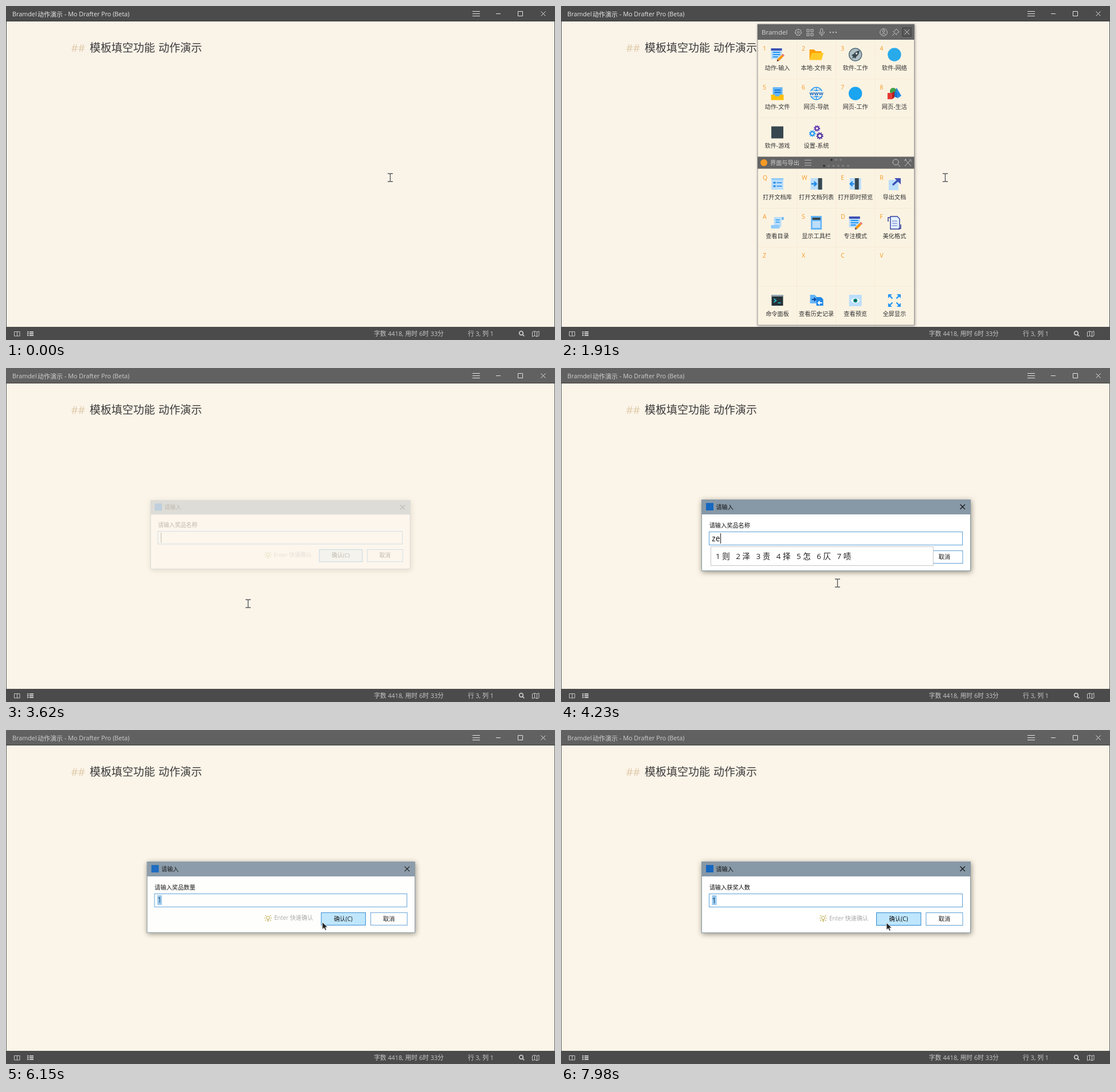
An HTML page that plays this animation: 958x584 px, repeating every 8 s.

```html
<!DOCTYPE html>
<html lang="zh">
<head>
<meta charset="utf-8">
<title>Template fill demo</title>
<style>
  html, body { margin: 0; width: 100%; height: 100%; overflow: hidden; background: #faf3e8; }
  svg { display: block; width: 100vw; height: 100vh; }
  text { font-family: "Open Sans", "Noto Sans CJK SC", "Noto Sans CJK", sans-serif; white-space: pre; }
  #popup { filter: drop-shadow(1px 1px 2px rgba(0, 0, 0, .35)); }
  #dialog { filter: drop-shadow(1px 2px 5px rgba(70, 75, 55, .6)); }
</style>
</head>
<body>
<svg id="stage" viewBox="0 0 958 584"></svg>
<script>
const $ = id => document.getElementById(id);

// Drawing helpers; text is placed by its vertical centre.
const R = (x, y, w, h, fill, more = '') => `<rect x="${x}" y="${y}" width="${w}" height="${h}" fill="${fill}" ${more}/>`;
const C = (x, y, r, fill, more = '') => `<circle cx="${x}" cy="${y}" r="${r}" fill="${fill}" ${more}/>`;
const P = (d, fill, more = '') => `<path d="${d}" fill="${fill}" ${more}/>`;
const L = (d, color, w = 1) => P(d, 'none', `stroke="${color}" stroke-width="${w}"`);
const T = (x, y, s, size, fill, more = '') =>
  `<text x="${x}" y="${y + size * .37}" font-size="${size}" fill="${fill}" ${more}>${s}</text>`;
const at = (x, y, s) => `<g transform="translate(${x} ${y})">${s}</g>`;
const mid = 'text-anchor="middle"';
const ring = (x, y, r, color, w = 1, more = '') => C(x, y, r, 'none', `stroke="${color}" stroke-width="${w}" ${more}`);
const gear = (x, y, r, color, w = 2) =>
  ring(x, y, r, color, w) + ring(x, y, r + w * .8, color, w, `stroke-dasharray="${r * .5}"`);
const lens = (x, y, r, color, w) => ring(x, y, r, color, w) + L(`M${x + r * .7},${y + r * .7}l${r * .9},${r * .9}`, color, w);

// Icons, centred on 0,0 and about 24 px wide.
const pale = '#bbdefb', blue = '#2196f3', navy = '#3f51b5', slate = '#37474f';
const pad = R(-11, -11, 19, 19, pale) + R(-11, -11, 19, 4, navy) +
  L('M-8,-4H5M-8,0H5M-8,4H1', blue, 2) + L('M1.5,9.5L9,2', '#ff9800', 4.2) +
  L('M9,2l2,-2', '#e57373', 4.2) + P('M-1,12L0,8L3,11Z', '#5d4037');
const pane = side => R(-10, -10, 20, 20, pale) + R(side > 0 ? 3 : -1, -10, 7, 20, slate) +
  L(side > 0 ? 'M-9,0H0M-4,-4L0,0L-4,4' : 'M-9,0H-2M-5,-4L-9,0L-5,4', '#1e88e5', 2.4);
const doc = (x, y, color) => P(`M${x},${y}h8l4,4v11h-12z`, color);

const topIcons = [
  pad,
  P('M-12,-9H-4L-1,-6H9V9H-12Z', '#ffa000') + P('M-8,-3H12.5L9,9.5H-12Z', '#ffca28'),
  C(0, 0, 11, '#b0bec5', 'stroke="#546e7a" stroke-width="1.5"') +
    P('M7,-7Q0,-6 -3,-1L-7,1L-4,3L-6,7L-2,5L0,7L2,3Q7,0 7,-7Z', slate) + C(2, -2, 1.7, '#eceff1'),
  C(0, 0, 11.7, '#29aaeb'),
  R(-8, -11, 17, 16, '#64b5f6') + L('M-5,-6H6M-5,-2H6', '#1976d2', 2) + P('M-11,2H-5L-3,5H3L5,2H11V11.5H-11Z', '#ffc107'),
  ring(0, 0, 10.7, blue, 1.5) + ring(0, 0, 5, blue, 1.2) + L('M0,-11V11M-9,-6H9M-9,6H9', blue, 1.2) +
    R(-12, -4, 24, 8, '#faf3e4') + T(0, -.8, 'www', 9.5, '#1565c0', mid + ' font-weight="700"'),
  C(0, 0, 11.7, '#1ba4f0'),
  C(-2, -4, 6, '#43a047') + P('M4,-10L-2,5L6,8Z', '#1976d2') + P('M4,-10L12,4L6,8Z', '#1e88e5') +
    R(-12, -1, 8, 11, '#e53935') + P('M-4,-1L0,-4V7L-4,10Z', '#b71c1c'),
  R(-10.5, -10.5, 21, 21, slate),
  gear(1, -7, 3, '#5e35b1') + gear(-7, 2, 3.2, blue) + gear(6, 6, 3.6, '#4527a0')
];
const lowIcons = [
  R(-10.5, -10, 21, 20, pale) + R(-10.5, -10, 21, 3, '#90caf9') + L('M-7,-2H-3M-7,4H-3', '#1e88e5', 3) + L('M-1,-2H8M-1,4H8', '#1e88e5', 1.6),
  pane(1),
  pane(-1),
  R(-10, -7, 17, 18, pale) + L('M-3,2L7,-7', navy, 3.4) + P('M0,-10H11V1Z', navy),
  P('M-6,-10H11V-5H7V7H-6Z', pale) + P('M-11,4H4V10H-11Z', '#90caf9') + R(8, -10, 3, 5, '#64b5f6') + L('M-3,-5H4M-3,-1H4', blue, 1.3),
  R(-9.5, -12, 19, 24, '#64b5f6') + R(-7, -9, 14, 4, slate) + R(-7, -3, 14, 12, pale),
  pad,
  P('M-7,-11H5L9,-7V11H-7Z', '#e3f2fd', 'stroke="#303f9f" stroke-width="1.4"') +
    L('M-4,-3H5M-4,1H5M-4,5H5', '#5c6bc0', 1.2) + L('M-11,-2V-9H-7M11,3V10H7', '#303f9f', 1.5),
  , , , ,
  R(-10, -10, 20, 19, '#263238') + R(-10, -10, 20, 3, '#90a4ae') + L('M-6,-3L-2,0L-6,3M1,4H6', '#26c6da', 1.6),
  doc(-11, -10, '#64b5f6') + doc(0, -6, '#1e88e5') + L('M-8,-2H-1M-4,-5L-1,-2L-4,1', '#0d47a1', 1.8) + L('M10,4H3M6,1L3,4L6,7', '#fff', 1.8),
  R(-11, -10, 22, 20, pale) + P('M-8,0Q0,-9 8,0Q0,9 -8,0Z', '#fff') + C(0, 0, 3.6, '#009688') + C(0, 0, 1.6, '#263238'),
  [0, 90, 180, 270].map(a => `<g transform="rotate(${a})">${P('M11,-11V-4L4,-11Z', blue) + L('M3.5,-3.5L8,-8', blue, 2.4)}</g>`).join('')
];

function grid(top, rows, keys, labels, icons) {
  let s = '';
  for (let i = 1; i < 4; i++) s += R(343 + i * 68.1, top, 1, rows * 68, '#f5ead4');
  for (let i = 1; i < rows; i++) s += R(344, top + i * 68, 272, 1, '#f5ead4');
  for (let i = 0; i < rows * 4; i++) {
    const x = 377.5 + i % 4 * 68.1, y = top + (i >> 2) * 68;
    s += T(x - 25.5, y + 15, keys[i] || '', 10.5, '#f59a23');
    if (labels[i]) s += at(x, y + 26, icons[i]) + T(x, y + 49.5, labels[i], 10.2, '#333', mid);
  }
  return s;
}

const lightGray = '#c4c4c4';
const popup = R(343, 32, 273.5, 526, '#fbf3e2', 'stroke="#999"') + R(343, 32, 273.5, 27, '#646464') +
  T(350, 45.5, 'Bramdel', 11.5, '#d6d6d6') + gear(414, 46, 5, lightGray, .9) + ring(414, 46, 1.8, lightGray, .9) +
  [[429, 41], [436, 41], [429, 48], [436, 48]].map(([x, y]) => R(x, y, 4, 4, 'none', `stroke="${lightGray}"`)).join('') +
  R(452.8, 39.5, 4, 8, 'none', `rx="2" stroke="${lightGray}"`) + L('M450.5,45Q451,50 455,50Q459,50 459.5,45M455,50V53', lightGray) +
  [470, 475, 480].map(x => C(x, 46, 1.2, lightGray)).join('') +
  ring(563, 46, 6.3, lightGray) + ring(563, 44, 2.1, lightGray) + L('M559,50.5Q563,45.5 567,50.5', lightGray) +
  L('M578,52L582,48M579,44L586,51M581,45L585,40L590,45L585,49', lightGray) +
  R(596, 38, 15, 15, '#5a5a5a', 'stroke="#383838"') + L('M599.5,41.5L607.5,49.5M607.5,41.5L599.5,49.5', '#d0d0d0') +
  grid(59, 3, '12345678', ['动作-输入', '本地-文件夹', '软件-工作', '软件-网络', '动作-文件', '网页-导航', '网页-工作', '网页-生活', '软件-游戏', '设置-系统'], topIcons) +
  R(343, 263.5, 273.5, 21, '#646464') + C(354, 274, 6, '#f59a23') + T(365, 274, '界面与导出', 10.2, '#d0d0d0') +
  L('M425,269.5H437M425,274.5H437M425,278.5H437', '#b5b5b5') +
  [472, 480, 488].map((x, i) => C(x, 269, 2, i ? '#7c7c7c' : '#333')).join('') +
  [459, 467, 475.5, 484, 492, 501].map((x, i) => C(x, 279.5, 2, i ? '#7c7c7c' : '#333')).join('') +
  lens(584, 273, 5, lightGray, 1) + L('M600,268L611,280M611,268L600,280M599,271L603,267M608,268L612,272', lightGray) +
  grid(285, 4, 'QWERASDFZXCV', ['打开文档库', '打开文档列表', '打开即时预览', '导出文档', '查看目录', '显示工具栏', '专注模式', '美化格式', , , , , '命令面板', '查看历史记录', '查看预览', '全屏显示'], lowIcons);

const edge = 'stroke="#5b9fd6"';
const dialog = R(245.5, 230.5, 469, 124, '#fff', 'stroke="#8496a4"') + R(245.5, 230.5, 469, 25.5, '#8798a7') +
  R(253, 236, 13, 13, '#1667c0') + T(270.5, 243, '请输入', 10.1, '#111') +
  L('M696.5,238.5L705,247M705,238.5L696.5,247', '#111', 1.1) +
  T(258.7, 275, '', 10.2, '#111', 'id="ask"') + R(258.5, 286.5, 442, 23, '#fff', edge) +
  R(263.5, 289, 8, 17, '#99c9ef', 'id="mark"') + T(263.3, 297.5, '', 13.7, '#111', 'id="value"') +
  R(264, 289, 1, 18, '#111', 'id="caret"') +
  ring(457.5, 328.5, 2.8, '#b3a136') + L('M456,332.5H459M456,334.5H459M451,329H453M462,329H464M452.5,324L454,325.5M462.5,324L461,325.5M452.5,333.5L454,332M462.5,333.5L461,332', '#b3a136', 1.1) +
  T(468, 329, 'Enter 快速确认', 10.1, '#a8a8a8') +
  R(550.5, 319.5, 77.5, 22, '#e5f3fd', 'id="ok" stroke="#2a86cf"') + T(589, 330, '确认(C)', 10.2, '#111', mid) +
  R(637, 319.5, 64, 22, '#fff', edge) + T(669, 330, '取消', 10.2, '#111', mid);

const gray = '#c8c8c8';
const beam = 'M-4.5,-7H-1L0,-6L1,-7H4.5M0,-6V6M-4.5,7H-1L0,6L1,7H4.5';
$('stage').innerHTML =
  R(0, 0, 958, 584, '', 'id="frame"') + R(1, 27, 956, 534, '', 'id="page"') +
  `<g id="title">${T(11, 14.5, 'Bramdel', 10.8)}${T(55, 14.5, '动作演示', 11)}${T(102, 14.5, '- Mo Drafter Pro (Beta)', 10.8)}</g>`.replace(/fill="undefined"/g, '') +
  L('M814,9.5H827M814,13.5H827M814,17.5H827M855,13.5H863M893.5,9.5H901.5V17.5H893.5ZM933.5,9.5L941.5,17.5M941.5,9.5L933.5,17.5', '#e4e4e4') +
  R(0, 26, 958, 1, '#3d3d3d') + R(0, 561, 958, 23, '#4b4b4b') +
  L('M14.5,569.5H24V577H14.5ZM19.5,569V577', gray) + L('M37,570H39.5M41,570H48M37,573H39.5M41,573H48M37,576H39.5M41,576H48', gray, 2) +
  T(642, 573, '字数 4418, 用时 6时 33分', 10.8, gray) + T(806, 573, '行 3, 列 1', 10.8, gray) +
  lens(899, 572, 3.3, gray, 1.7) + L('M918.5,570L922.5,568.5L926.5,570L930,568.5V576.5L926.5,578L922.5,576.5L918.5,578ZM922.5,569V577M926.5,570V578', gray) +
  T(113.5, 72.5, '##', 19, '#dfcaa9') + T(146, 72.5, '模板填空功能', 19, '#3b3b3b') + T(266, 72.5, '动作演示', 19, '#3b3b3b') +
  R(113, 106, 1, 16, '#333', 'id="edit"') +
  `<g id="popup">${popup}</g><g id="dialog">${dialog}</g>` +
  `<g id="ime">${R(261.5, 312.5, 0, 33, '#fff', 'id="strip" stroke="#c6c6c6"') + T(270, 329, '', 13.5, '#222', 'id="words"')}</g>` +
  `<g id="beam">${L(beam, '#fff', 2.4) + L(beam, '#555', 1.4)}</g>` +
  '<g id="arrow">' + P('M0,0V12.5L3,9.8L5,14.3L7.2,13.3L5.2,9H9.2Z', '#222', 'stroke="#eee" stroke-width=".8"') + '</g>';

const prompts = [
  { open: 3545, close: 5700, ask: '请输入奖品名称' },
  { open: 5865, close: 6830, ask: '请输入奖品数量' },
  { open: 6960, close: 9000, ask: '请输入获奖人数' }
];
// Time, typed text, right end of the candidate strip, candidates.
const typing = [
  [0, '', 0, ''],
  [4150, 'z', 656, '1 在   2 这   3 中   4 做   5 只   6 最   7 再'],
  [4230, 'ze', 650, '1 则   2 泽   3 责   4 择   5 怎   6 仄   7 啧'],
  [4460, "ze'n", 757, '1 责难   2 则能   3 泽南   4 择你   5 则   6 泽   7 责'],
  [4520, "ze'nu", 728, '1 泽努   2 则怒   3 责怒   4 则   5 泽   6 责   7 择'],
  [4760, "ze'nu'p", 716, '1 泽努普   2 泽努   3 则   4 泽   5 责   6 择'],
  [4820, "ze'nu'pa", 700, '1 泽努帕   2 泽努   3 则   4 泽   5 责   6 择'],
  [4970, '泽努帕', 0, '']
];
const path = [
  [0, 670.5, 300], [2370, 670.5, 300], [3110, 422.5, 412], [3620, 422.5, 412], [3860, 482.5, 376],
  [5490, 482.5, 376], [5690, 566, 334], [5900, 566, 334], [6150, 552, 336], [6230, 521, 304],
  [6300, 517, 299], [6370, 523, 313], [6670, 523, 313], [6820, 596, 333], [7110, 596, 333],
  [7470, 469, 301], [7690, 469, 301], [7980, 568, 337], [9000, 568, 337]
];

const ramp = (t, a, b) => Math.min(1, Math.max(0, (t - a) / (b - a)));
const within = (v, a, b) => v >= a && v < b;
const show = (id, on) => $(id).setAttribute('opacity', +on);
const latest = (list, t, time) => list.filter(e => time(e) <= t).pop();
const inBox = ([x, y], a, b, c, d) => within(x, a, c) && within(y, b, d);

function pointer(t) {
  const i = path.findIndex(k => k[0] > t), [a, x, y] = path[i - 1], [b, u, v] = path[i];
  const k = ramp(t, a, b), e = k * k * (3 - 2 * k);
  return [x + (u - x) * e, y + (v - y) * e];
}

function draw(t) {
  const active = t < 3540;
  $('frame').setAttribute('fill', active ? '#4b4b4b' : '#616161');
  $('page').setAttribute('fill', active ? '#faf3e8' : '#fbf4e8');
  $('title').setAttribute('fill', active ? '#e8e8e8' : '#cfcfcf');
  show('edit', within(t, 450, 920) || within(t, 1370, 1910) || within(t, 2370, 2840));

  const menu = ramp(t, 1160, 1370) * (t >= 1230) * (1 - ramp(t, 3180, 3330));
  show('popup', menu);

  const prompt = latest(prompts, t, p => p.open) || prompts[0], first = prompt === prompts[0];
  const alpha = ramp(t, prompt.open, prompt.open + 300) * (1 - ramp(t, prompt.close, prompt.close + 110));
  const scale = .963 + .037 * alpha * alpha;
  show('dialog', alpha);
  $('dialog').setAttribute('transform', `translate(446 262) scale(${scale}) translate(-446 -262)`);
  $('ask').textContent = prompt.ask;

  const [, typed, right, words] = latest(typing, t, e => e[0]);
  $('value').textContent = first ? typed : '1';
  $('value').setAttribute('fill', first ? '#111' : '#234a70');
  show('mark', !first);
  show('caret', first && t < 5350);
  $('caret').setAttribute('x', 264 + (typed && first ? $('value').getComputedTextLength() : 0));
  show('ime', right > 0);
  $('strip').setAttribute('width', Math.max(0, right - 262));
  $('words').textContent = words;

  const p = pointer(t), onDialog = alpha > .05 && inBox(p, 246, 230, 714, 354);
  const arrow = menu > .5 && inBox(p, 343, 32, 617, 558) || onDialog && !inBox(p, 258, 286, 701, 310);
  $('ok').setAttribute('fill', onDialog && inBox(p, 550, 319, 628, 342) ? '#bee6fd' : '#e5f3fd');
  for (const id of ['beam', 'arrow']) {
    show(id, arrow === (id === 'arrow'));
    $(id).setAttribute('transform', `translate(${p})`);
  }
}

function tick() {
  draw(performance.now() % 8000);
  requestAnimationFrame(tick);
}
tick();
</script>
</body>
</html>
```
